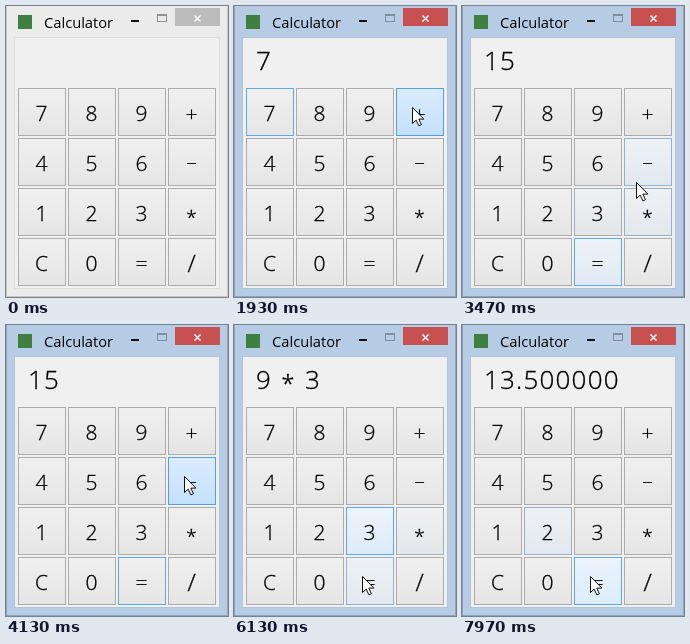
Animation of 222x291 px, one loop 8000 ms. Source, as an HTML page with a canvas:

```html
<!DOCTYPE html>
<html>
<head>
<meta charset="utf-8">
<title>Calculator</title>
<style>
  html, body { margin: 0; width: 100%; height: 100%; overflow: hidden; }
  canvas { display: block; }
</style>
</head>
<body>
<canvas id="stage" width="222" height="291"></canvas>
<script>
const ctx = document.getElementById("stage").getContext("2d");
const LOOP = 8000, START = 590, STEP = 95.5;
const FONT = '"Open Sans", sans-serif';
const KEYS = "789+456-123*C0=/";
const ENTRY = { x: 205, y: 175 };

// Keys visited by the pointer and the step of each press; "pass" only moves over
const STOPS = [
  ["7", 5], ["+", 14], ["8", 19], ["/", 24, "pass"], ["=", 26],
  ["-", 36], ["6", 41], ["=", 45], ["*", 51], ["3", 56], ["=", 59],
  ["/", 66], ["2", 71], ["=", 75]
].map(([char, step, pass]) => ({ char, step, pass, leave: pass ? step - 1 : step + 1 }));
const PRESSES = STOPS.filter(stop => !stop.pass);

// Operator drawing: character, scale, vertical shift in em
const OPERATORS = { "-": ["–", 1, -0.08], "*": ["*", 0.9, 0.12], "/": ["/", 1.15, 0.06] };

const COMPUTE = {
  "+": (a, b) => a + b, "-": (a, b) => a - b,
  "*": (a, b) => a * b, "/": (a, b) => a / b
};

// Top, bottom and border colours: idle, hovered, pressed
const LOOKS = [["#f0f0f0", "#e5e5e5", "#acacac"], ["#ecf4fc", "#dcecfc", "#7eb4ea"],
  ["#daecfc", "#c4e0fc", "#569de5"]];

const corner = key => ({ x: 12 + key % 4 * 50, y: 82 + Math.floor(key / 4) * 50 });

function restingPoint(stop) {
  if (!stop) return ENTRY;
  const { x, y } = corner(KEYS.indexOf(stop.char));
  return { x: x + 16, y: y + 19 };
}

// The pointer sets off after a press and arrives one step before the next
function pointerAt(step) {
  if (step < 1) return null;
  const next = STOPS.findIndex(stop => step < stop.leave);
  if (next < 0) return restingPoint(STOPS[STOPS.length - 1]);
  const leave = next ? STOPS[next - 1].leave : 1;
  const travel = Math.min(4, STOPS[next].step - 1 - leave);
  const k = Math.min(1, (step - leave) / travel);
  const from = restingPoint(STOPS[next - 1]), to = restingPoint(STOPS[next]);
  return {
    x: from.x + (to.x - from.x) * Math.sin(k * Math.PI / 2),
    y: from.y + (to.y - from.y) * k
  };
}

function keyAt(step) {
  const p = pointerAt(step);
  if (!p) return -1;
  const col = Math.floor((p.x - 12) / 50), row = Math.floor((p.y - 82) / 50);
  return col >= 0 && col < 4 && row >= 0 && row < 4 ? row * 4 + col : -1;
}

const isPressed = (key, step) => PRESSES.some(
  p => p.char === KEYS[key] && step >= p.step && step < p.step + 2);

// 0 idle, 1 hovered, 2 pressed; hover fades in quickly and out slowly
function glow(key, step) {
  let level = 0;
  for (let s = 0; s <= step; s++) {
    if (keyAt(s) !== key) level = Math.max(0, Math.min(1, level) - 0.13);
    else if (isPressed(key, s)) level = 2;
    else level = Math.min(1, level + 0.45);
  }
  return level;
}

function look(level, part) {
  const i = Math.min(1, Math.floor(level));
  const share = (level - i) * 100;
  return `color-mix(in srgb, ${LOOKS[i + 1][part]} ${share}%, ${LOOKS[i][part]})`;
}

function rect(x, y, w, h, color) {
  ctx.fillStyle = color;
  ctx.fillRect(x, y, w, h);
}

function frame(x, y, w, h, color) {
  ctx.strokeStyle = color;
  ctx.lineWidth = 1;
  ctx.strokeRect(x + 0.5, y + 0.5, w - 1, h - 1);
}

function text(str, x, y, size, weight, align = "left") {
  ctx.font = `${weight} ${size}px ${FONT}`;
  ctx.textAlign = align;
  ctx.fillStyle = ctx.strokeStyle = "#000";
  ctx.fillText(str, x, y);
  if (weight > 300) return;
  ctx.lineWidth = 0.3;
  ctx.strokeText(str, x, y);
}

function symbol(char, x, y, size) {
  const [glyph, scale, shift] = OPERATORS[char] || [char, 1, 0];
  text(glyph, x, y + shift * size, size * scale, 300, "center");
}

function drawWindow(active) {
  const edge = active ? "#8fa4bc" : "#c6c6c6";
  rect(0, 0, 222, 291, edge);
  rect(1, 0, 220, 290, active ? "#b6cce4" : "#ebebeb");
  rect(8, 31, 206, 252, "#f0f0f0");
  frame(8, 31, 206, 252, active ? "#b0c4da" : "#dedede");

  rect(12, 9, 14, 14, "#3f7f3f");
  text("Calculator", 38, 22, 14.7, 400);
  rect(125, 14, 8, 2, "#111");
  const disabled = active ? "#7f8fa0" : "#939393";
  frame(151, 8, 10, 8, disabled);
  rect(151, 8, 10, 2, disabled);

  rect(169, 2, 45, 18, active ? "#c75050" : "#bcbcbc");
  ctx.strokeStyle = "#fff";
  ctx.lineWidth = 1.5;
  ctx.beginPath();
  for (const side of [-3, 3]) {
    ctx.moveTo(191.5 - side, 9.5);
    ctx.lineTo(191.5 + side, 15.5);
  }
  ctx.stroke();
}

function drawKey(key, step, focused) {
  const { x, y } = corner(key);
  const level = glow(key, step);
  const fill = ctx.createLinearGradient(0, y, 0, y + 48);
  fill.addColorStop(0, look(level, 0));
  fill.addColorStop(1, look(level, 1));
  rect(x, y, 48, 48, fill);
  frame(x, y, 48, 48, focused ? "#60a8e6" : look(level, 2));
  symbol(KEYS[key], x + 23.5, y + 33, 21);
}

const format = value => Number.isInteger(value) ? String(value) : value.toFixed(6);

// Replays the presses so far, each showing two steps after it begins
function readout(step) {
  let first = "", operator = "", second = "";
  for (const { char } of PRESSES.filter(p => p.step + 2 <= step)) {
    if (char === "=") {
      first = format(COMPUTE[operator](+first, +second));
      operator = second = "";
    } else if (char in COMPUTE) operator = char;
    else if (operator) second += char;
    else first += char;
  }
  return [first, operator, second];
}

function drawDisplay(step) {
  const [first, operator, second] = readout(step);
  ctx.letterSpacing = "1.2px";
  text(first, 22, 64, 26, 300);
  const end = 22 + ctx.measureText(first).width;
  text(second, end + 33, 64, 26, 300);
  ctx.letterSpacing = "0px";
  symbol(operator, end + 16, 64, 26);
}

function drawPointer({ x, y }) {
  ctx.save();
  ctx.translate(Math.round(x) + 0.5, Math.round(y) + 0.5);
  const arrow = new Path2D("M0 0V16L3.7 12.6L6.4 18.4L8.9 17.3L6.3 11.6H11.4Z");
  ctx.fillStyle = "#fff";
  ctx.fill(arrow);
  ctx.strokeStyle = "#111";
  ctx.lineWidth = 1;
  ctx.stroke(arrow);
  ctx.restore();
}

function draw(now) {
  const step = Math.floor((now % LOOP - START) / STEP);
  const focus = PRESSES.filter(p => p.step + 1 < step).pop();
  drawWindow(step >= 0);
  for (let key = 0; key < KEYS.length; key++) {
    drawKey(key, step, focus && focus.char === KEYS[key]);
  }
  drawDisplay(step);
  const pointer = pointerAt(step);
  if (pointer) drawPointer(pointer);
  requestAnimationFrame(() => draw(performance.now() - origin));
}

const origin = performance.now();
draw(0);
</script>
</body>
</html>
```
